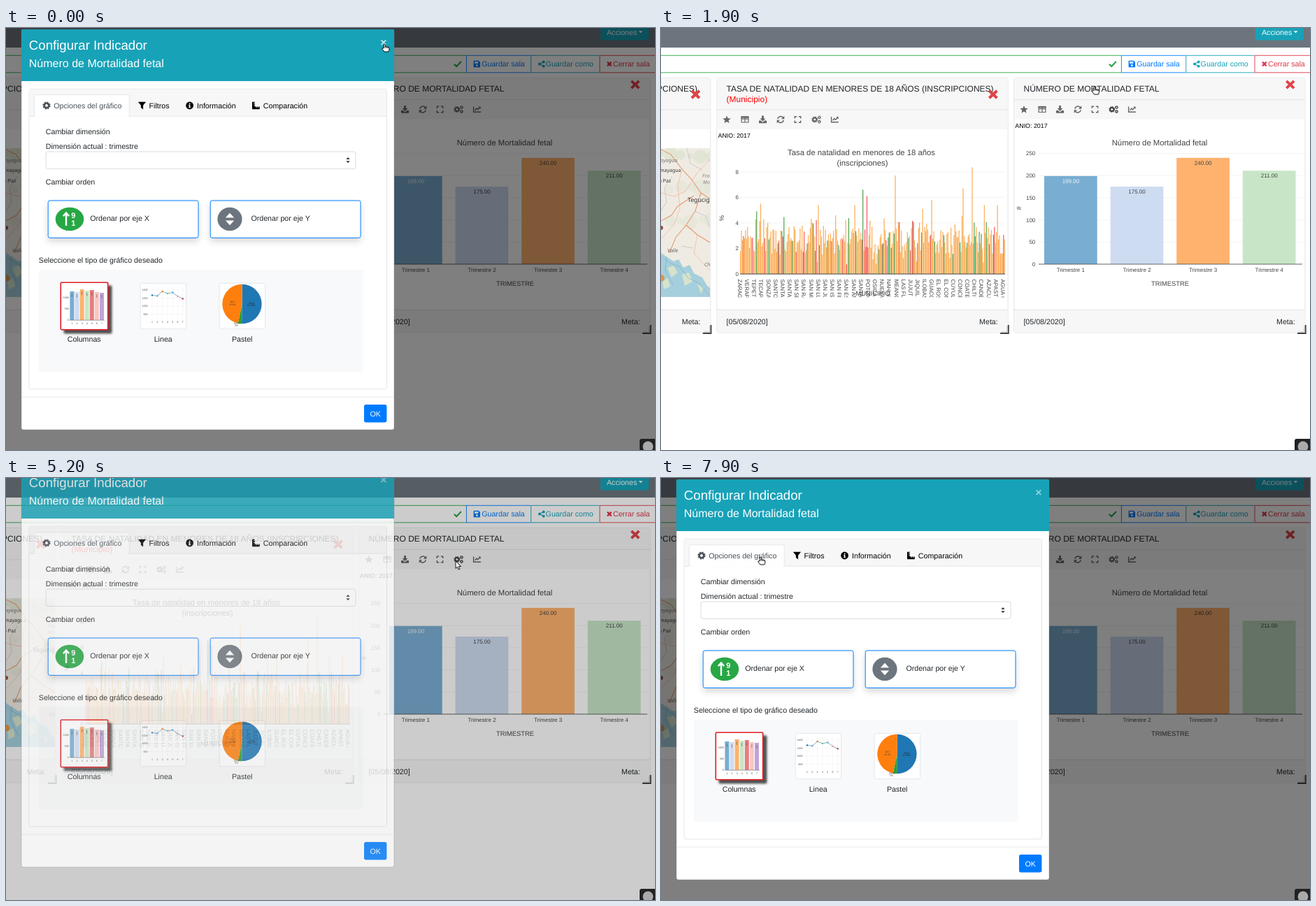
An HTML page that plays this animation: 928 by 604 pixels, repeating every 8 s.

```html
<!DOCTYPE html>
<html lang="es">
<head>
<meta charset="utf-8">
<title>Configurar Indicador</title>
<style>
html, body { margin: 0; width: 100%; height: 100%; overflow: hidden; background: #fff; }
svg { display: block; width: 928px; height: 604px; font-family: "Liberation Sans", Arial, sans-serif; text-rendering: geometricPrecision; }
.map { font-family: "Noto Sans", sans-serif; }
</style>
</head>
<body>
<svg id="stage" viewBox="0 0 928 604"></svg>
<script>
const BASE = 10.667;
const INK = '#212529', TEAL = '#17a2b8', BLUE = '#007bff', GREEN = '#28a745', RED = '#dc3545', LINE = '#dfdfdf';

const text = (x, y, s, size = BASE, fill = INK, attrs = '') =>
  `<text x="${x}" y="${y}" font-size="${size}" fill="${fill}" ${attrs}>${s}</text>`;
const mid = (x, y, s, size, fill) => text(x, y, s, size, fill, 'text-anchor="middle"');
const end = (x, y, s, size, fill) => text(x, y, s, size, fill, 'text-anchor="end"');
const rect = (x, y, w, h, fill, attrs = '') =>
  `<rect x="${x}" y="${y}" width="${w}" height="${h}" fill="${fill}" ${attrs}/>`;
const box = (x, y, w, h, fill, stroke, r = 2.7, sw = 0.8) =>
  rect(x, y, w, h, fill, `rx="${r}" stroke="${stroke}" stroke-width="${sw}"`);
const path = (d, stroke, w = 1, fill = 'none', attrs = '') =>
  `<path d="${d}" stroke="${stroke}" stroke-width="${w}" fill="${fill}" ${attrs}/>`;
const shape = (d, fill) => `<path d="${d}" fill="${fill}"/>`;
const circle = (x, y, r, fill, attrs = '') => `<circle cx="${x}" cy="${y}" r="${r}" fill="${fill}" ${attrs}/>`;
const place = (x, y, body, attrs = '') => `<g transform="translate(${x} ${y})" ${attrs}>${body}</g>`;

// Icons are centred on 0,0 and use currentColor.
const C = 'currentColor';
const gear = (x, y, r) =>
  circle(x, y, r * 0.62, 'none', `stroke="${C}" stroke-width="${r * 0.5}"`) +
  circle(x, y, r * 0.88, 'none', `stroke="${C}" stroke-width="${r * 0.36}" stroke-dasharray="${r * 0.37} ${r * 0.321}"`);
const starPoints = Array.from({ length: 10 }, (_, i) => {
  const r = i % 2 ? 2.7 : 6, a = i * Math.PI / 5;
  return `${(r * Math.sin(a)).toFixed(2)} ${(0.4 - r * Math.cos(a)).toFixed(2)}`;
}).join('L');
const icons = {
  star: shape(`M${starPoints}Z`, C),
  table: path('M-4.9-4H4.9V4H-4.9ZM-5-.8H5M0-3V4', C, 1.2) + rect(-5.4, -4.6, 10.8, 2.4, C),
  download: shape('M-1.4-5.4H1.4V-1.6H4L0 2.4L-4-1.6H-1.4Z', C) + shape('M-5.5 1.6H-2.6L0 4L2.6 1.6H5.5V5.2H-5.5Z', C),
  sync: path('M-4.4-.9A4.5 4.5 0 0 1 3.4-2.9M4.4.9A4.5 4.5 0 0 1-3.4 2.9', C, 1.5) +
    shape('M5.3-5.2V-.8H1ZM-5.3 5.2V.8H-1Z', C),
  expand: path('M-4.2-1.4V-4.2H-1.4M1.4-4.2H4.2V-1.4M4.2 1.4V4.2H1.4M-1.4 4.2H-4.2V1.4', C, 1.4),
  cogs: gear(-2.2, 0, 4.2) + gear(4.4, -3, 2.4) + gear(4.4, 3.1, 2.4),
  chart: path('M-4.9-4V3.7H5.4', C, 1.4) + path('M-2.9 1.2L-.6-1.4L1.1.3L4.2-2.8', C, 1.4) + shape('M1.9-3.9H5.2V-.6Z', C),
  gear: gear(0, 0, 5.3),
  filter: shape('M-5.6-5.3H5.6L1.6-.2V5.4L-1.6 3V-.2Z', C),
  info: circle(0, 0, 5.4, C) + circle(0, -2.5, 1, '#fff') + shape('M-1.5-.9H.8V2.2H1.5V3.3H-1.5V2.2H-.8V.2H-1.5Z', '#fff'),
  ruler: shape('M-5.4-5.3H-1.6V-3.9H-3.2V-3H-1.6V-1.2H-3.2V-.3H-1.6V1.5H.2V3H1.2V1.5H3V3H4V1.5H5.4V5.3H-5.4Z', C),
  check: path('M-5 .3L-1.6 3.5L5-3.4', C, 2.1),
  save: shape('M-4.7-4.7H2.6L4.7-2.6V4.7H-4.7Z', C) + rect(-3.3, -3.4, 5.3, 2.7, '#fff') + circle(0, 2, 1.4, '#fff'),
  share: path('M3-3L-2.8 0L3 3.2', C, 1.2) + circle(3, -3, 1.9, C) + circle(-2.8, 0, 1.9, C) + circle(3, 3.2, 1.9, C),
  times: path('M-2.9-2.9L2.9 2.9M2.9-2.9L-2.9 2.9', C, 2.2),
  close: path('M-5.4-5.2L5.4 5.2M5.4-5.2L-5.4 5.2', C, 3.7)
};
const icon = (name, x, y, color, id = '') => place(x, y, icons[name], `color="${color}" ${id && `id="${id}"`}`);

const toolbar = (x, y, cogId) =>
  ['star', 'table', 'download', 'sync', 'expand', 'cogs', 'chart']
    .map((n, i) => icon(n, x + [0, 26, 51.5, 77, 101.5, 128, 154.5][i], y, '#666', n === 'cogs' ? cogId : '')).join('');

function card(x, headEnd, closeY) {
  const w = 416.3, r = x + w;
  return box(x, 71.3, w, 364.7, '#fff', LINE) +
    rect(x + 0.4, 71.7, w - 0.8, headEnd + 28 - 71.7, '#f7f7f7') +
    path(`M${x} ${headEnd}H${r}`, LINE, 0.8) +
    rect(x + 0.4, 403.3, w - 0.8, 32.4, '#f7f7f7') + path(`M${x} 403.3H${r}`, LINE, 0.8) +
    text(x + 13.7, 423.5, '[05/08/2020]') + text(r - 41, 423.5, 'Meta:') +
    path(`M${r - 11} 437H${r + 0.7}V425`, '#444', 1.9) + path(`M${r - 10} 435H${r - 1.2}V426`, '#aaa', 0.7) +
    icon('close', r - 21.3, closeY, '#df4348');
}

function map() {
  let s = rect(0, 172, 70, 213, '#efebe3');
  for (let i = 0; i < 16; i++)
    s += circle((i * 29) % 73, 180 + (i * 47) % 140, 4 + (i * 5) % 9, i % 3 ? '#e4e6d6' : '#dbe4cd', 'opacity=".7"');
  s += shape('M0 322L9 328L18 334L25 331L32 343L41 339L47 351L59 357L66 369L70 372V385H0Z', '#a5cfdc') +
    shape('M9 343L18 340L24 350L15 357ZM30 353L40 350L45 363L34 369ZM2 363L10 358L13 370L4 374ZM52 366L61 372L57 380Z', '#d5e3cc') +
    path('M0 174L14 181L30 202L44 217L57 236L70 244M57 236L49 262L36 282L21 300L12 322M36 282L52 296L70 307M0 276L15 268L24 255L47 240', '#e59b72', 1.1) +
    path('M0 236L19 241L35 234L52 207L70 188M30 202L24 226L27 258L19 281L0 302M52 296L47 322L60 337L70 347', '#f0b9a0', 0.8) +
    path('M0 262L8 249L5 229L16 212M37 172L42 194L59 203M48 262L64 269L70 285M29 312L46 315', '#b8b4bd', 0.6) +
    path('M0 327L14 337L27 342L39 358L54 365L69 383M8 327L6 347L18 369', '#7fa9c2', 0.6) +
    circle(0, 286, 3, '#9d4d3a') + circle(0, 358, 5, '#dd9545');
  const label = (x, y, t, size, fill, it) => text(x, y, t, size, fill, it ? 'font-style="italic"' : '');
  s += label(-1, 192, 'ayagua', 7.3, '#777', 1) + label(-2, 206, 'mayagua', 7, '#333') + label(-3, 221, 'a Paz', 7, '#333') +
    label(59, 214, 'Fra.', 7.3, '#888', 1) + label(60, 223, 'Mo', 7, '#888', 1) + label(38, 249, 'Tegucigal', 8.7, '#333') +
    label(9, 321, 'Valle', 7.3, '#666', 1) + label(62, 341, 'Cho', 7.3, '#777', 1);
  return `<g clip-path="url(#mapClip)" class="map">${s}</g>`;
}

const towns = ('ZARAG,VERAP,TEPET,TECAP,SONZA,SANTO,SANTA,SANTA,SAN SE,SAN RA,SAN MI,SAN LU,SAN JU,SAN IS,SAN FR,SAN ES,SAN AN,' +
  'SANTA,POTON,OSICA,NUEVA,NAHUI,MEANG,LAS FL,JUJUT,JIQUIL,ILOBAS,GUACO,EL ROS,EL CON,CUYUL,CONCE,COATE,CHILTI,CANDE,AZACU,APAST,AGUA C').split(',');

function birthChart() {
  const peaks = { 16: 4.9, 20: 5.5, 77: 5.4, 113: 5.4, 121: 6.6, 125: 6.1, 153: 7.7, 180: 5.1, 189: 5.8, 220: 6.7, 229: 8.35, 241: 5.4, 254: 5.4 };
  const tint = { 16: '#4da351', 121: '#4da351', 125: '#f4575a' };
  let seed = 77, s = '';
  const rnd = () => (seed = (seed * 16807) % 2147483647) / 2147483647;
  for (let v = 0; v <= 8; v += 2) {
    const y = 352 - v * 18.27;
    s += path(`M113 ${y}H492`, v ? '#eee' : '#444', 0.7) + end(111, y + 2.9, v, 8, '#444');
  }
  for (let i = 0; i < 262; i++) {
    const k = rnd(), v = peaks[i] || 1.5 + 2.2 * rnd() + (rnd() > 0.75 ? 0.9 : 0) - (rnd() > 0.95 ? 1 : 0);
    const color = tint[i] || (peaks[i] || k < 0.74 ? '#fbad55' : k < 0.92 ? '#4da351' : '#f4575a');
    s += rect((113 + i * 1.447).toFixed(2), (352 - v * 18.27).toFixed(2), 1.2, (v * 18.27).toFixed(2), color);
  }
  s += path('M113 352H492', '#444', 0.7);
  const labels = towns.map((t, i) => place((110 + i * 10.16).toFixed(2), 359.5, text(0, 0, t, 8, '#444'), '')
    .replace(')"', ') rotate(90)"')).join('');
  return s + `<g clip-path="url(#townClip)">${labels}</g>` +
    mid(303, 383, 'MUNICIPIO', 9.33, '#444') +
    mid(286.5, 181.8, 'Tasa de natalidad en menores de 18 años', 11.33, '#444') +
    mid(288, 196.6, '(inscripciones)', 11.33, '#444') +
    text(0, 0, '%', 9.33, '#444', 'text-anchor="middle" transform="translate(90 272) rotate(-90)"');
}

function deathChart() {
  const colors = ['#79add2', '#cedcf1', '#ffb26e', '#c8e6c7'];
  let s = '';
  for (let v = 0; v <= 250; v += 50) {
    const y = 338 - v * 0.634;
    s += path(`M540 ${y}H917`, '#eee', 0.7) + end(535.3, y + 2.9, v, 8, '#444');
  }
  [199, 175, 240, 211].forEach((v, i) => {
    const x = 548 + i * 94.6, h = v * 0.634;
    s += rect(x, 338 - h, 75.7, h, colors[i]) + mid(x + 37.9, 348 - h, v + '.00', 8, i ? '#444' : '#f2f5f8') +
      mid(x + 37.9, 349.4, `Trimestre ${i + 1}`, 8, '#444');
  });
  return s + path('M540 338H917', '#444', 0.8) + mid(728, 368.7, 'TRIMESTRE', 9.33, '#444') +
    mid(713, 167.7, 'Número de Mortalidad fetal', 11.33, '#444') +
    text(0, 0, '#', 9.33, '#444', 'text-anchor="middle" transform="translate(514.5 258) rotate(-90)"');
}

const page = () =>
  rect(0, 0, 928, 604, '#fff') + rect(0, 0, 928, 28, '#6c757d') +
  rect(850, -8, 69, 25.5, TEAL, 'rx="2.7"') + text(859, 9.6, 'Acciones', BASE, '#fff') + shape('M904.6 4.2H910.4L907.5 7.2Z', '#fff') +
  path('M0 39.3H658M0 63.8H658', GREEN, 0.9) +
  path('M751 39.3H848.5M751 63.8H848.5M750.7 39V64', TEAL, 0.9) +
  path('M658.4 39V64M658 39.3H750M658 63.8H750', BLUE, 0.9) +
  path('M928 39.3H849V63.8H928', RED, 0.9) +
  icon('check', 645.8, 51.5, GREEN) + icon('save', 673.3, 51.5, BLUE) + icon('share', 765.7, 51.5, TEAL) + icon('times', 862.8, 51.5, RED) +
  text(680.2, 55.4, 'Guardar sala', BASE, BLUE) + text(771.6, 55.4, 'Guardar como', BASE, TEAL) + text(868, 55.4, 'Cerrar sala', BASE, RED) +
  card(-345.5, 117, 95) + end(52, 91, '(INSCRIPCIONES)', 12) + icon('close', 49.3, 95, '#df4348') + map() +
  card(79.8, 117, 95) + text(93.5, 91, 'TASA DE NATALIDAD EN MENORES DE 18 AÑOS (INSCRIPCIONES)', 12) +
  icon('close', 475, 95, '#df4348') + text(93.5, 105.8, '(Municipio)', 12, '#f00') +
  toolbar(94, 131) + text(81.5, 156.6, 'ANIO: 2017', 8.89, '#000') + birthChart() +
  card(504.7, 102.5, 81) + text(518.5, 91, 'NÚMERO DE MORTALIDAD FETAL', 12) +
  toolbar(519, 116.5, 'cogs') + text(506.3, 142.6, 'ANIO: 2017', 8.89, '#000') + deathChart();

function barThumb() {
  const colors = ['#79add2', '#cedcf1', '#ffb26e', '#c8e6c7', '#e67d7e', '#fac5c4', '#bfa4d7'];
  return box(78.3, 364.3, 67.4, 67.4, '#fff', '#e01b22', 1, 1.6).replace('/>', ' filter="url(#thumbShadow)"/>') +
    [41, 40, 44, 42, 43, 40, 39].map((h, i) => rect(91.4 + i * 7.1, 418 - h, 6, h, colors[i]) +
      rect(93.7 + i * 7.1, 421 - h, 1.2, 5, '#555', 'opacity=".55"') + mid(94.5 + i * 7.1, 423.5, i + 1, 3.6, '#444')).join('') +
    ['0', '500', '1000'].map((t, i) => end(89.7, 419.3 - i * 16.4, t, 3.6, '#444')).join('') + path('M91 418.2H141', '#444', 0.5);
}

function lineThumb() {
  const ys = [382.5, 383.5, 377, 380, 378.5, 384, 387.5];
  const pts = ys.map((y, i) => [209 + i * 7.3, y]);
  let s = box(192.2, 365.3, 65.4, 65.4, '#fff', '#dee2e6', 2.5);
  for (let i = 0; i < 4; i++) s += path(`M205 ${375 + i * 11.5}H255`, '#eee', 0.5) + end(202.5, 376 + i * 11.5, 1400 - i * 200, 3.6, '#444');
  s += pts.map(([x], i) => path(`M${x} 371V416`, '#eee', 0.5) + mid(x, 421.8, i + 1, 3.6, '#444')).join('');
  s += path('M' + pts.map(p => p.join(' ')).join('L'), '#5b9ec9', 0.8);
  return s + pts.map(([x, y], i) => circle(x, y, 1.2, ['#1f77b4', '#6ea3d8', '#ff7f0e', '#7dc47a', '#5ba8c4', '#e99', '#c33f55'][i])).join('');
}

function pieThumb() {
  const cx = 337.6, cy = 395, r = 28.3;
  const at = a => `${(cx + r * Math.sin(a * Math.PI / 180)).toFixed(2)} ${(cy - r * Math.cos(a * Math.PI / 180)).toFixed(2)}`;
  const slice = (a, b, fill) => shape(`M${cx} ${cy}L${at(a)}A${r} ${r} 0 0 1 ${at(b)}Z`, fill);
  return box(305.2, 365.3, 65.4, 65.4, '#fff', '#dee2e6', 2.5) +
    slice(0, 181, '#1f77b4') + slice(181, 192, '#2ca02c') + slice(192, 360, '#ff7f0e') +
    mid(351, 394.5, '2018', 3.4, '#222') + mid(351, 398, '51.28%', 3.4, '#222') +
    mid(324, 393, '2017', 3.4, '#444') + mid(324, 396.5, '45.6%', 3.4, '#444') +
    mid(329.5, 424, '2019', 3.4, '#444') + mid(329.5, 427.3, '3%', 3.4, '#444');
}

const orderButton = (x, label, labelX) =>
  box(x, 247, 214.8, 53.4, '#fff', BLUE, 2.7, 1).replace('/>', ' filter="url(#softShadow)"/>') + text(labelX, 276, label);

const modal = () =>
  box(22, 2, 533, 573, '#fff', '#7d7d7d', 3, 0.4) + shape('M22 76V4Q22 2 24 2H553Q555 2 555 4V76Z', TEAL) +
  text(32.8, 30.6, 'Configurar Indicador', 18.667, '#fff') + text(32.8, 55.6, 'Número de Mortalidad fetal', 16, '#fff') +
  `<g id="close">${text(540, 26.3, '×', 16, '#fff', 'text-anchor="middle" font-weight="bold"')}</g>` +
  rect(525, 2.5, 30, 37, 'none', 'id="ring" stroke="#101010" stroke-opacity=".6" stroke-width=".9"') +
  box(33, 87.3, 511.5, 429.5, '#fff', LINE) + rect(33.4, 87.7, 510.7, 38.3, '#f7f7f7') +
  path('M33 126.2H544.5', LINE, 0.8) + path('M40.3 126.7V98.5Q40.3 95.7 43 95.7H173.5Q176.2 95.7 176.2 98.5V126.7', '#dee2e6', 0.8, '#fff') +
  icon('gear', 58, 111, '#495057') + text(68.2, 114.8, 'Opciones del gráfico', BASE, '#495057') +
  icon('filter', 194.5, 111, '#000') + text(204.6, 114.8, 'Filtros', BASE, '#000') +
  icon('info', 262.6, 111, '#000') + text(273, 114.8, 'Información', BASE, '#000') +
  icon('ruler', 357.4, 111, '#000') + text(367.8, 114.8, 'Comparación', BASE, '#000') +
  text(56.8, 151.7, 'Cambiar dimensión') + text(56.8, 172.5, 'Dimensión actual : trimestre') +
  box(57, 177, 443, 24.6, '#fff', '#ced4da') + shape('M486.3 188L489 184.9L491.7 188ZM486.3 190.2L489 193.3L491.7 190.2Z', '#343a40') +
  text(56.8, 224.4, 'Cambiar orden') +
  orderButton(60.2, 'Ordenar por eje X', 120.2) + orderButton(292.2, 'Ordenar por eje Y', 350.4) +
  `<ellipse cx="91" cy="273.5" rx="20.3" ry="16.7" fill="${GREEN}"/><ellipse cx="320" cy="273.5" rx="17.6" ry="16.7" fill="#6c757d"/>` +
  path('M86 283V266M81.8 269.3L86 264.6L90.2 269.3', '#fff', 2.4) +
  mid(96.3, 272, '9', 11, '#fff').replace('<text', '<text font-weight="bold"') + mid(96.3, 283, '1', 11, '#fff').replace('<text', '<text font-weight="bold"') +
  shape('M313.8 271.5L320 264.8L326.2 271.5ZM313.8 275.5L320 282.2L326.2 275.5Z', '#fff') +
  text(46.8, 335.9, 'Seleccione el tipo de gráfico deseado') + rect(47, 346, 463.5, 146, '#f8f9fa') +
  barThumb() + lineThumb() + pieThumb() +
  mid(111.7, 449, 'Columnas') + mid(224.7, 449, 'Linea') + mid(337.7, 449, 'Pastel') +
  path('M22 528.2H555', '#dee2e6', 0.8) + rect(512, 539, 32.4, 25.5, BLUE, 'rx="2.7"') + mid(528.2, 555.6, 'OK', BASE, '#fff');

const stage = document.getElementById('stage');
stage.innerHTML = `<defs>
  <clipPath id="mapClip"><rect y="172" width="70" height="213"/></clipPath>
  <clipPath id="townClip"><rect x="100" y="358" width="395" height="27.5"/></clipPath>
  <filter id="softShadow" x="-10%" y="-30%" width="120%" height="180%"><feDropShadow dx="0" dy="5" stdDeviation="5" flood-opacity=".15"/></filter>
  <filter id="thumbShadow" x="-20%" y="-20%" width="150%" height="150%"><feDropShadow dx="5" dy="5" stdDeviation="1.8" flood-color="#333" flood-opacity=".85"/></filter>
</defs>` + page() + rect(0, 0, 928, 604, '#000', 'id="shade"') + `<g id="modal">${modal()}</g>` +
  shape('M906 604V591Q906 588 909 588H928V604Z', '#222') + circle(918, 599, 7.5, '#aaa') +
  `<g id="tip">${box(643.4, 134.4, 56.2, 24.2, '#2b2b2b', '#1a1a1a', 3)}${mid(671.5, 149.6, 'Configurar', 9, '#fff')}</g>` +
  `<g id="cursor">
    ${path('M0 0V10.4L2.5 8.2L4.1 12L5.9 11.2L4.3 7.5H7.6Z', '#000', 0.9, '#fff', 'id="arrow" stroke-linejoin="round"')}
    ${path('M.2 6V1.2Q.2 0 1.2 0T2.3 1.2V3.6Q3.5 3 4.3 4Q5.6 3.4 6.2 4.4Q7.8 4 7.9 5.6V8.4L6.9 11H1L-2 7.2Q-2.3 5.6-1 5.7ZM2.3 3.6V5.6M4.3 4V5.8M6.2 4.4V6', '#000', 0.95, '#fff', 'id="hand" stroke-linejoin="round"')}
  </g>`;

// Rows: start time, dialog opacity, dialog shift, shade opacity.
const fades = [
  [0, 1, 0, .5], [900, .93, -2, .47], [1000, .45, -14, .29], [1100, .04, -26, .08], [1200, 0, -33, 0],
  [5100, .2, -29, .06], [5200, .8, -18, .2], [5300, 1, -8.7, .34], [5400, 1, -3, .45], [5500, 1, 0, .5]
];
// Rows: start time, pointer x, y, hand shape.
const moves = [
  [0, 540, 23, 1], [900, 539, 23, 0], [1500, 542, 26, 0], [1600, 554, 35, 0], [1700, 574, 52, 0], [1800, 599, 70, 0],
  [1900, 618.5, 84, 1], [2000, 628, 95, 1], [2100, 634, 104, 0], [2200, 637, 111, 0], [2300, 639, 115, 0],
  [2400, 640.5, 117, 1], [2800, 642.8, 118.7, 1], [5100, 643, 119, 0],
  [6000, 612, 113, 0], [6100, 500, 105, 0], [6200, 380, 107, 1], [6300, 302, 117, 1], [6400, 254, 129, 0], [6500, 234, 135, 0],
  [7000, 226, 132, 0], [7100, 200, 127, 0], [7200, 158, 120, 1], [7300, 112, 114, 1], [7400, 78, 110, 1],
  [7500, 67, 108, 1], [7600, 88, 109, 1], [7700, 126, 113, 1], [7900, 141, 113, 1]
];
const cogColors = [[0, '#666'], [900, '#444'], [2400, '#f00'], [5100, '#444'], [5500, '#666']];

const at = (rows, t) => rows.filter(r => r[0] <= t).pop();
const el = id => document.getElementById(id);
const set = (id, name, value) => el(id).setAttribute(name, value);
const show = (id, on) => set(id, 'visibility', on ? 'visible' : 'hidden');

function draw(now) {
  const t = now % 8000;
  const [, opacity, shift, shade] = at(fades, t);
  const [, x, y, hand] = at(moves, t);
  set('modal', 'opacity', opacity);
  set('modal', 'transform', `translate(0 ${shift})`);
  set('shade', 'opacity', shade);
  set('cursor', 'transform', `translate(${x} ${y})`);
  show('hand', hand);
  show('arrow', !hand);
  set('cogs', 'color', at(cogColors, t)[1]);
  set('close', 'opacity', t < 900 ? .75 : .5);
  show('ring', t >= 700 && t < 900);
  show('tip', t >= 3200 && t < 4700);
  requestAnimationFrame(() => draw(performance.now() - start));
}
const start = performance.now();
draw(0);
</script>
</body>
</html>
```
